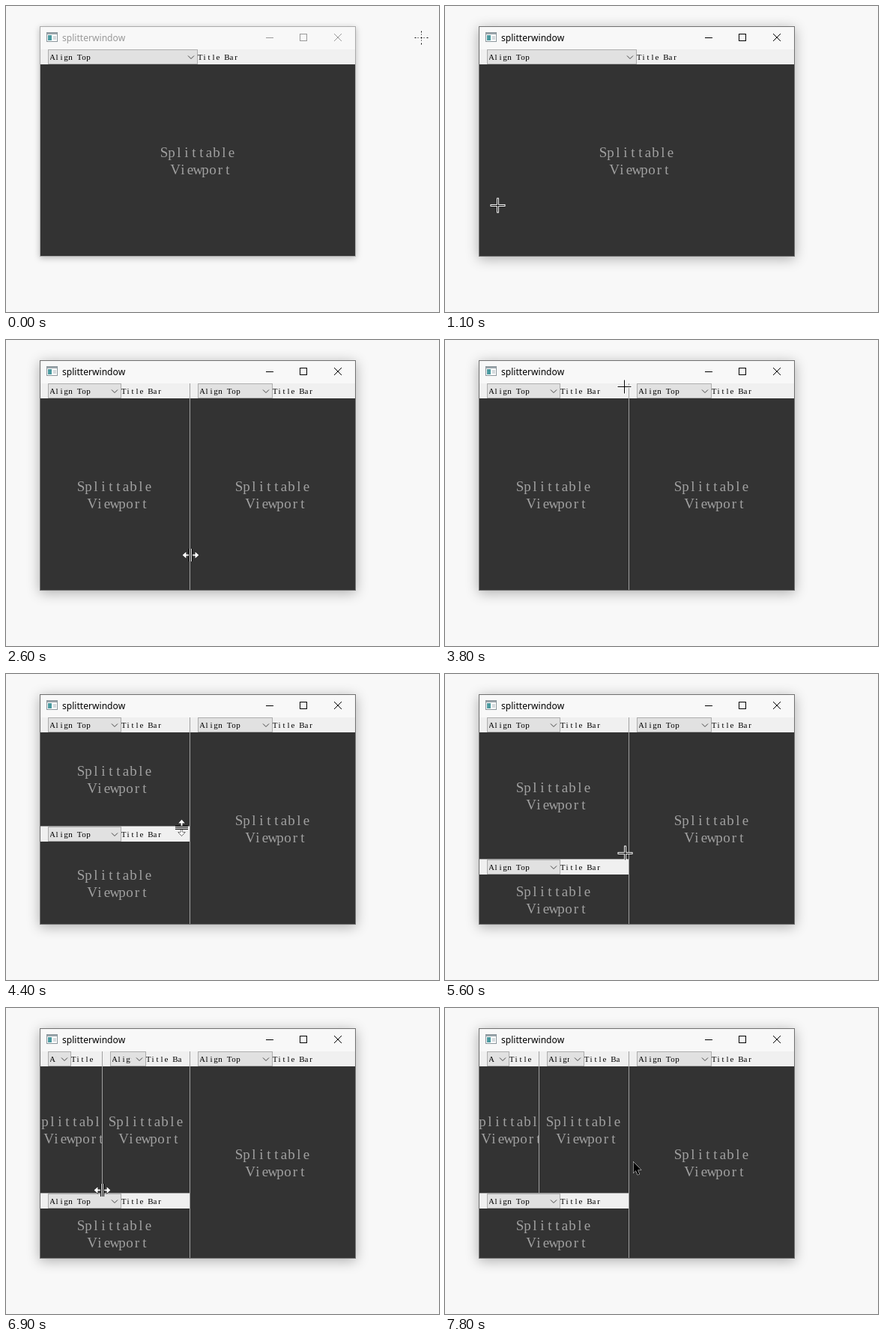
Animation of 578 by 409 pixels, one loop 8 s. Source, as an HTML page with a canvas:

```html
<!DOCTYPE html>
<html lang="en">
<head>
<meta charset="utf-8">
<title>splitterwindow</title>
<style>
html, body { margin: 0; width: 100%; height: 100%; overflow: hidden; background: #f8f8f8; }
canvas { display: block; }
</style>
</head>
<body>
<canvas id="stage" width="578" height="409"></canvas>
<script>
const g = document.getElementById('stage').getContext('2d');
const LOOP = 8000, STEP = 100, LAG = 15;
const SERIF = 'px "Liberation Serif", serif';
const GRAY = '#a0a0a0';
const L = 46, T = 58, R = 466, B = 334;

// Pointer moves: start, end, target x, target y, shape
const START = [554, 42];
const moves = [
  [100, 900, 78, 243, arrow],
  [950, 1400, 48, 331, cross],
  [1700, 2105, 228, 287, split],
  [2300, 2600, 246, 287, split],
  [2900, 3800, 239, 62, cross],
  [4000, 4400, 234, 205, rowSplit],
  [4400, 4600, 235, 225, rowSplit],
  [4800, 5100, 236, 248, rowSplit],
  [5200, 5600, 240, 239, cross],
  [5900, 6400, 154, 240, split],
  [6400, 7000, 126, 243, split],
  [7200, 7500, 253, 205, arrow],
  [7700, 7800, 251, 205, arrow]];

function ease(t, start, end) {
  const p = Math.min(1, Math.max(0, (t - start) / (end - start)));
  return p * p * (3 - 2 * p);
}

function pointer(t) {
  let [x, y] = START;
  for (const [start, end, toX, toY] of moves) {
    const p = ease(t, start, end);
    x += (toX - x) * p;
    y += (toY - y) * p;
  }
  return [Math.round(x), Math.round(y)];
}

// A divider trails the pointer until it is dropped.
const divider = (t, dropped, axis) => pointer(Math.min(t - LAG, dropped))[axis] - 1;

function box(x, y, w, h, color) {
  g.fillStyle = color;
  g.fillRect(x, y, w, h);
}

function frame(x, y, w, h, color) {
  g.strokeStyle = color;
  g.strokeRect(x + .5, y + .5, w - 1, h - 1);
}

function line(color, ...pts) {
  g.strokeStyle = color;
  g.beginPath();
  pts.forEach(([x, y]) => g.lineTo(x, y));
  g.stroke();
}

// Fixed-pitch text: each letter is centred in its cell.
function cells(text, x, y, size, pitch, color) {
  g.font = size + SERIF;
  g.fillStyle = color;
  g.textAlign = 'center';
  [...text].forEach((c, i) => g.fillText(c, x + (i + .5) * pitch, y));
}

function clipped(x, y, w, h, draw) {
  if (w <= 0 || h <= 0) return;
  g.save();
  g.beginPath();
  g.rect(x, y, w, h);
  g.clip();
  draw();
  g.restore();
}

const half = w => (w - 20) / 2;
const wide = w => w * .526 - 6.7;

function pane(x, y, right, bottom, comboWidth = half) {
  const w = right - x, combo = Math.max(20, Math.round(comboWidth(w))), end = x + 10 + combo;
  const label = (text, left) => cells(text, left, y + 14, 11, 6, '#000');
  clipped(x, y, w, bottom - y, () => {
    box(x, y, w, 20, '#f0f0f0');
    box(x, y + 20, w, bottom - y - 20, '#333');
    box(x + 10, y, combo, 20, '#e1e1e1');
    frame(x + 10, y, combo, 20, '#adadad');
    clipped(x + 13, y, combo - 23, 20, () => label('Align Top', x + 13));
    line('#444', [end - 13, y + 8.5], [end - 9, y + 12.5], [end - 5, y + 8.5]);
    clipped(end, y, right - 10 - end, 20, () => label('Title Bar', end));
    const cx = Math.floor((x + right) / 2), cy = Math.floor((y + 20 + bottom) / 2);
    cells('Splittable', cx - 50, cy - 4, 19, 10, GRAY);
    cells('Viewport', cx - 35, cy + 19, 19, 10, GRAY);
  });
}

function chrome(active) {
  const ink = active ? '#000' : '#999';
  g.save();
  g.shadowColor = active ? 'rgba(0,0,0,.3)' : 'rgba(0,0,0,.25)';
  g.shadowBlur = active ? 16 : 8;
  g.shadowOffsetY = active ? 3 : 2;
  box(45, 27, 422, 308, '#f8f8f8');
  g.restore();
  frame(45, 27, 422, 308, active ? '#707070' : '#aaa');

  box(54, 35, 15, 13, '#fff');
  box(54, 35, 15, 3, '#9aa5ab');
  box(56, 39, 5, 7, '#4c9aa0');
  box(63, 40, 4, 5, '#d5dadd');
  frame(54, 35, 15, 13, '#8b969c');

  g.font = '12.1px "Noto Sans", "Open Sans", sans-serif';
  g.fillStyle = ink;
  g.textAlign = 'left';
  g.fillText('splitterwindow', 75, 47);
  line(ink, [347, 42.5], [357, 42.5]);
  frame(392, 37, 10, 10, ink);
  line(ink, [438, 37], [448, 47]);
  line(ink, [448, 37], [438, 47]);
}

function cross(t) {
  if (t < STEP) g.setLineDash([2, 2, 1, 3]);
  for (const [color, width, r] of [['#fff', 3, 10], ['#000', 1, 9]]) {
    g.lineWidth = width;
    line(color, [-r, 0], [r, 0]);
    line(color, [0, -r], [0, r]);
  }
}

function arrow() {
  g.fillStyle = '#000';
  line('#fff', [0, 0], [0, 15], [3.3, 11.8], [5.7, 17.5], [8, 16.5], [5.7, 11], [10.3, 11], [0, 0]);
  g.fill();
}

function split() {
  for (const side of [-1, 1]) {
    const p = (x, y) => [side * x, y];
    g.fillStyle = '#fff';
    line('#000', p(2, -1), p(6, -1), p(6, -4.5), p(11, 0), p(6, 4.5), p(6, 1), p(2, 1));
    g.fill();
  }
  box(-2.5, -8.5, 5, 17, '#000');
  box(-1.5, -8.5, 1, 17, '#fff');
  box(.5, -8.5, 1, 17, '#fff');
}

function rowSplit() {
  g.rotate(Math.PI / 2);
  split();
}

function panes(t) {
  if (t <= 1700) return pane(L, T, R, B);
  const x = divider(t, 2800, 0);
  let bottom = B;
  pane(x + 1, T, R, B);
  if (t > 4000) {
    bottom = divider(t, 5150, 1);
    pane(L, bottom + 1, x, B, wide);
    box(L, bottom, x - L, 1, GRAY);
  }
  if (t > 5900) {
    const inner = divider(t, 7100, 0);
    pane(L, T, inner, bottom);
    pane(inner + 1, T, x, bottom);
    box(inner, T, 1, bottom - T, GRAY);
  } else {
    pane(L, T, x, bottom, wide);
  }
  box(x, T, 1, B - T, GRAY);
}

function render(now) {
  const t = Math.floor(now % LOOP / STEP) * STEP;
  const [x, y] = pointer(t);
  const last = moves.filter(m => m[0] <= t).pop();
  g.lineWidth = 1;
  box(0, 0, 578, 409, '#f8f8f8');
  chrome(t >= 500);
  panes(t);
  g.save();
  g.translate(x + .5, y + .5);
  (last ? last[4] : cross)(t);
  g.restore();
  requestAnimationFrame(render);
}
requestAnimationFrame(render);
</script>
</body>
</html>
```
